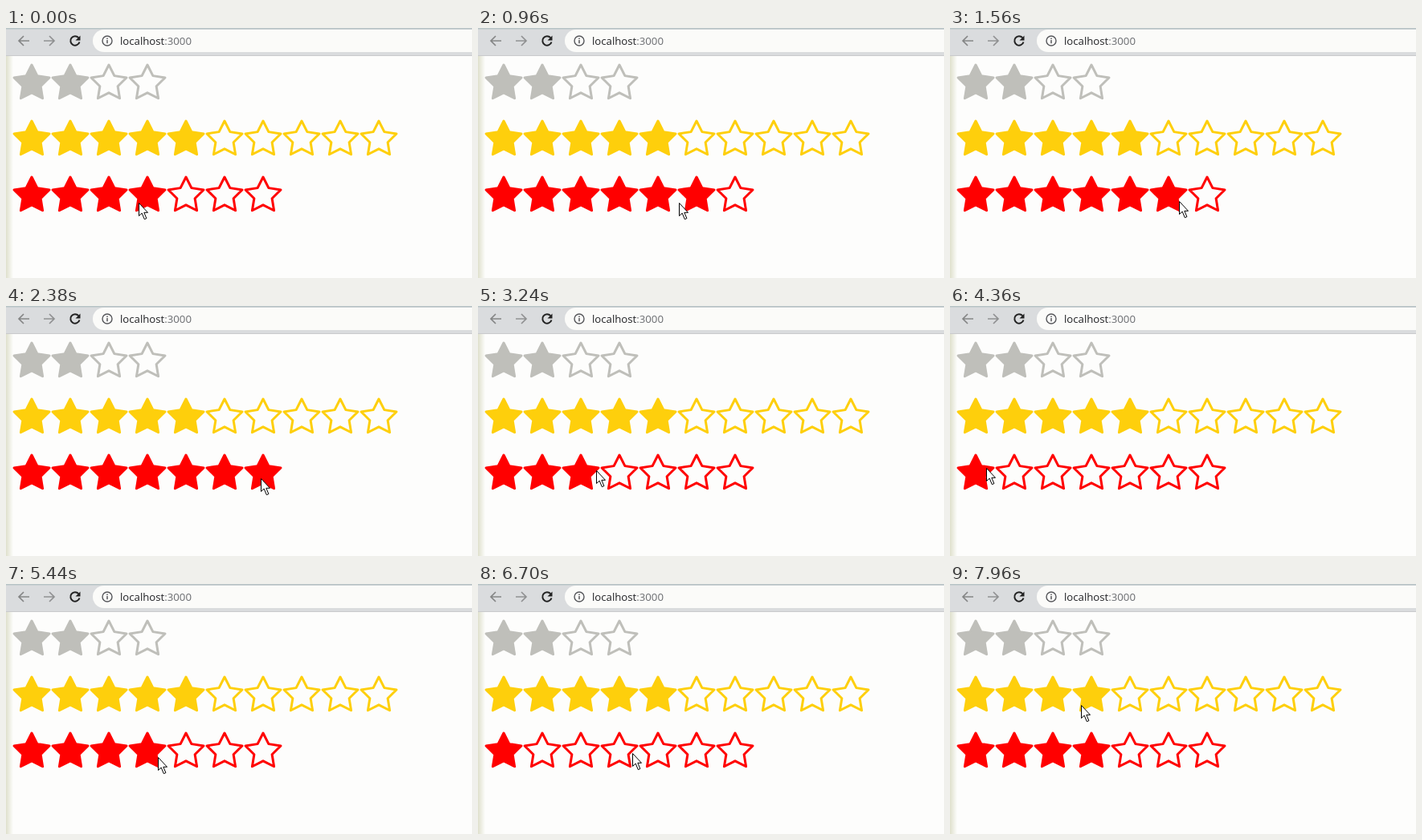
Recreate the animation shown at these times as an HTML page. Size 580 by 312 pixels, loop 8000 ms.

```html
<!DOCTYPE html>
<html lang="en">
<head>
<meta charset="utf-8">
<title>Star ratings</title>
<style>
  html, body { margin: 0; width: 100%; height: 100%; overflow: hidden; background: #fdfdfc; }
  svg { display: block; }
  text { font: 13.2px "Open Sans", "Noto Sans", sans-serif; }
</style>
</head>
<body>
<svg width="580" height="312" viewBox="0 0 580 312">
  <defs>
    <linearGradient id="edge">
      <stop offset="0" stop-color="#dfe0cc"/>
      <stop offset="1" stop-color="#fdfdfc"/>
    </linearGradient>
  </defs>

  <rect width="580" height="312" fill="#fdfdfc"/>
  <rect y="35" width="9" height="277" fill="url(#edge)"/>

  <g id="toolbar">
    <rect width="580" height="35" fill="#dadcde"/>
    <rect width="580" height="1.5" fill="#b8c4c6"/>
    <rect y="34" width="580" height="1" fill="#c9cacc"/>
    <rect x="108" y="2" width="500" height="28" rx="14" fill="#fbfbf9"/>
    <g fill="none" stroke-width="1.7">
      <path d="M29 16H16.5M22 10l-6 6 6 6" stroke="#858686"/>
      <path d="M47 16h12.5M54 10l6 6-6 6" stroke="#909192"/>
      <path d="M90.3 12.2A5.7 5.7 0 1 0 91.5 17.5" stroke="#222" stroke-width="2"/>
      <circle cx="126" cy="16" r="6" stroke="#55565a" stroke-width="1.4"/>
      <path d="M126 15v4.3M126 12.5v1.5" stroke="#55565a" stroke-width="1.5"/>
    </g>
    <path d="M92.5 9.5v6h-6z" fill="#222"/>
    <text x="142" y="21" fill="#202124">localhost<tspan fill="#6a6c70">:3000</tspan></text>
  </g>

  <g id="ratings" stroke-width="3" stroke-linejoin="round"></g>
  <path id="cursor" d="M.5.5V16.5L4.2 13.1l3.1 7.6 2.6-1.1-3.1-7.3H11.5z" fill="#fff" stroke="#000"/>
</svg>

<script>
const LOOP = 8000, SIZE = 48, LEFT = 8, HOVER_LAG = 20;
const ratings = document.getElementById('ratings');
const cursor = document.getElementById('cursor');

// Where the pointer turns or rests: time, x, y
const stops = [
  [20, 166, 218], [960, 251, 218], [2120, 318, 215], [2380, 318, 215],
  [3240, 148, 205], [3480, 66, 188], [4040, 337, 205], [4360, 46, 202],
  [4900, 33, 200], [5400, 196, 217], [5740, 46, 188], [6000, 195, 180],
  [6680, 195, 180], [6700, 193, 211], [7000, 64, 205], [7440, 165, 209],
  [7960, 164, 151]
];

// Clicking the first and later the fourth star changes the red rating
const redRating = t => t > 4700 && t < 7440 ? 1 : 4;

const rows = [
  makeRow(43, 4, '#bfbfba', () => 2),
  makeRow(113, 10, '#fecf0c', () => 5),
  makeRow(183, 7, '#ff0000', redRating)
];

function starPoints(cx, cy, outer = 23.1, inner = 11.7) {
  return Array.from({ length: 10 }, (_, i) => {
    const radius = i % 2 ? inner : outer, angle = i * Math.PI / 5;
    return [cx + radius * Math.sin(angle), cy - radius * Math.cos(angle)];
  }).join(' ');
}

function makeRow(top, count, color, rating) {
  const stars = Array.from({ length: count }, (_, i) => {
    const star = document.createElementNS('http://www.w3.org/2000/svg', 'polygon');
    star.setAttribute('points', starPoints(LEFT + (i + 0.5) * SIZE, top + 26.1));
    star.setAttribute('stroke', color);
    ratings.append(star);
    return star;
  });
  return { top, color, stars, rating };
}

function pointerAt(t) {
  const next = stops.findIndex(stop => stop[0] > t);
  const [t1, x1, y1] = stops.at(next);
  const [t0, x0, y0] = next > 0 ? stops[next - 1] : [t1 - 1, x1, y1];
  const k = Math.min(1, Math.max(0, (t - t0) / (t1 - t0)));
  const eased = k * k * (3 - 2 * k);
  return [x0 + (x1 - x0) * eased, y0 + (y1 - y0) * eased];
}

function render(t) {
  const [x, y] = pointerAt(t).map(Math.round);
  cursor.setAttribute('transform', `translate(${x - 1} ${y})`);

  // Hover fills trail the pointer slightly
  const [hoverX, hoverY] = pointerAt(t - HOVER_LAG);
  const hoverCount = Math.floor((hoverX - LEFT) / SIZE) + 1;
  for (const { top, color, stars, rating } of rows) {
    const hovered = hoverY >= top && hoverY < top + SIZE && hoverCount <= stars.length;
    const filled = hovered ? hoverCount : rating(t);
    stars.forEach((star, i) => star.setAttribute('fill', i < filled ? color : 'none'));
  }
}

const start = performance.now();
function tick() {
  render((performance.now() - start) % LOOP);
  requestAnimationFrame(tick);
}
tick();
</script>
</body>
</html>
```
